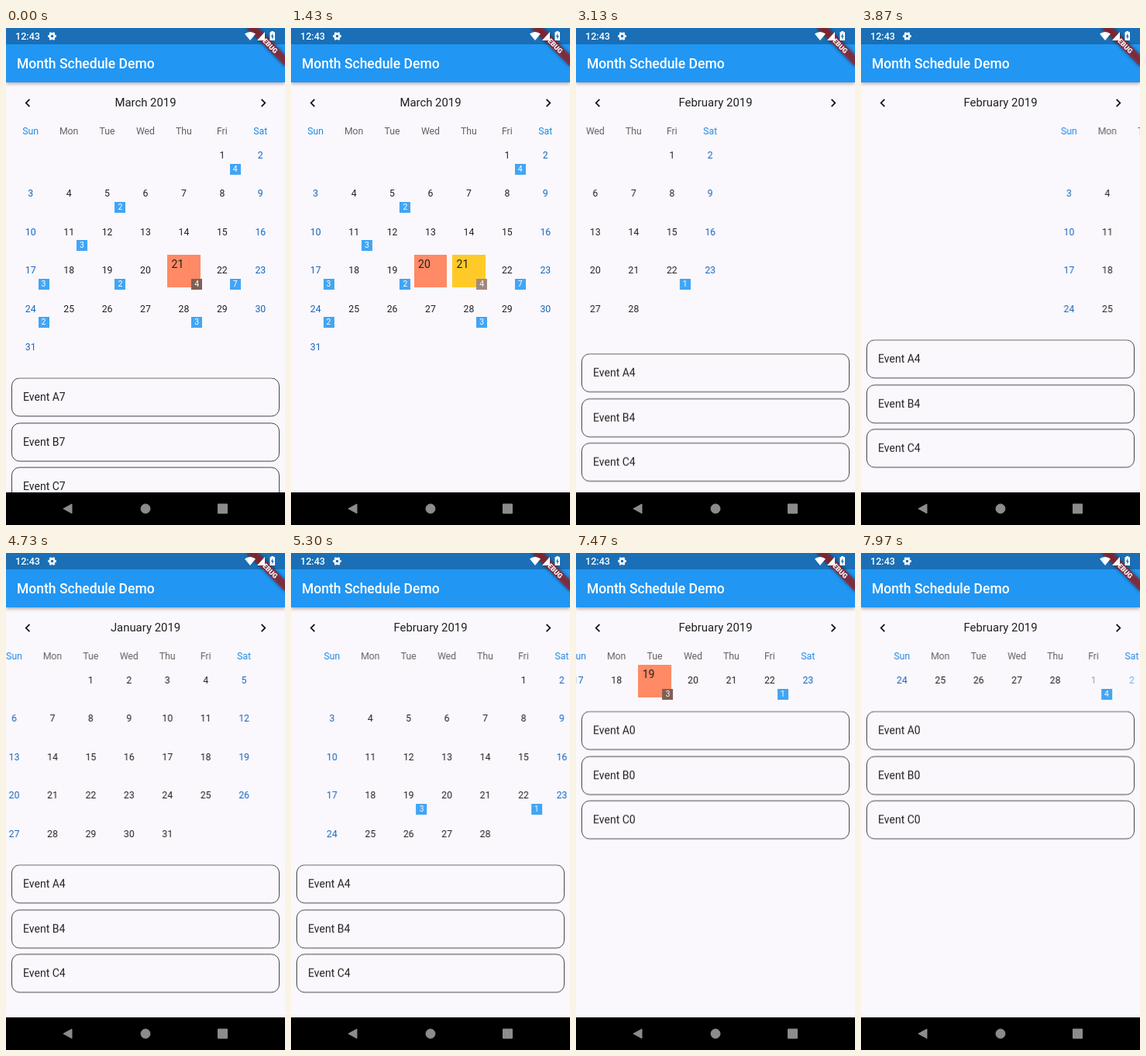
An HTML page that plays this animation: 360 by 640 pixels, repeating every 8000 ms.

```html
<!DOCTYPE html>
<html lang="en">
<head>
<meta charset="utf-8">
<title>Calendar</title>
<style>
html, body { margin: 0; width: 100%; height: 100%; overflow: hidden; }
body { position: relative; background: #faf8fc; font: 12.27px Roboto, sans-serif; color: #202020; }
div, svg { position: absolute; }
#stage { left: 0; top: 0; width: 360px; height: 640px; overflow: hidden; }
#bar { left: 0; top: 0; width: 360px; height: 70px; background: #2196f3; box-shadow: 0 2px 4px rgba(0,0,0,.3); }
#bar .status { left: 0; top: 0; width: 360px; height: 21px; background: #1a6fb6; }
#bar .name { left: 14px; top: 33px; line-height: 26px; font-size: 17.5px; font-weight: 500; color: #fff; white-space: nowrap; }
#top { left: 0; top: 0; }
#nav { left: 0; top: 598px; width: 360px; height: 42px; background: #000; }
.month { left: 0; top: 86px; width: 360px; line-height: 21px; font-size: 14.9px; text-align: center; }
.page { left: 7px; top: 0; width: 346px; height: 450px; }
.dow, .num { width: 49.43px; text-align: center; }
.dow { top: 123px; line-height: 20px; color: #616161; }
.dow.end { color: #1e88e5; }
.num { line-height: 49.43px; }
.num.end { color: #1565c0; }
.num.out { color: #9e9e9e; }
.num.out.end { color: #6fb1ee; }
.block { width: 42.4px; height: 42.4px; font-size: 14px; line-height: 16.4px; text-indent: 5.3px; padding-top: 4.4px; box-sizing: border-box; }
.badge { z-index: 1; width: 14px; height: 14px; line-height: 14px; font-size: 10.5px; text-align: center; color: #fff; }
#list { left: 0; top: 0; width: 360px; }
.event { left: 7px; width: 346px; height: 50.4px; box-sizing: border-box; border: 1px solid #444; border-radius: 10.5px; padding-left: 14px; font-size: 14px; line-height: 49px; }
</style>
</head>
<body>
<div id="stage">
  <div id="list"></div>
  <div id="pages"></div>
  <div id="bar">
    <div class="status"></div>
    <div class="name">Month Schedule Demo</div>
  </div>
  <div id="nav"></div>
  <svg id="top" width="360" height="640" font-family="Roboto, sans-serif" fill="#fff">
    <defs><filter id="soft" x="-20%" y="-80%" width="140%" height="260%"><feGaussianBlur stdDeviation="2.2"/></filter></defs>
    <g transform="translate(360 0) rotate(45)">
      <rect x="-35" y="24.5" width="70" height="10.5" fill="#000" opacity=".5" filter="url(#soft)"/>
      <rect x="-35" y="24.5" width="70" height="10.5" fill="#b71c1c" opacity=".63"/>
      <text y="33" text-anchor="middle" font-size="8.94" font-weight="900">DEBUG</text>
    </g>
    <text x="12" y="15.2" font-size="12.6" font-weight="500">12:43</text>
    <g fill="none" stroke="#fff">
      <circle cx="59.5" cy="10.5" r="3.1" stroke-width="2.6"/>
      <circle cx="59.5" cy="10.5" r="4.7" stroke-width="1.6" pathLength="12" stroke-dasharray="1 1" stroke-dashoffset=".5"/>
    </g>
    <path d="M308 7.4Q315 2.4 322 7.4L315 16z"/>
    <path d="M324 16H334V5z"/>
    <path d="M340.500 5.300H342.300V4H345.200V5.300H347V16H340.500z"/>
    <path d="M344.300 6.800L341.800 11.200H343.300V14.600L345.800 10.200H344.300z" fill="#1a6fb6"/>
    <g fill="#111">
      <path transform="translate(17.5 86) scale(.8766)" d="M15.410 7.410L14 6l-6 6 6 6 1.410-1.410L10.830 12z"/>
      <path transform="translate(321.500 86) scale(.8766)" d="M8.590 16.590L10 18l6-6-6-6-1.410 1.410L13.170 12z"/>
    </g>
    <g fill="#8c8c8c" stroke="#8c8c8c" stroke-linejoin="round">
      <path d="M74 619L85 613V625z"/>
      <circle cx="180" cy="619" r="6"/>
      <rect x="273.500" y="613" width="12" height="12"/>
    </g>
  </svg>
</div>
<script>
const LOOP = 8000, CELL = 49.43, TOP = 140;
const ORANGE = '#ff8a65', AMBER = '#ffca28', BLUE = '#42a5f5', BROWN = '#806054', TAN = '#a1887f';
const DECEL = 'cubic-bezier(.3333,.6667,.6667,1)';
const DECEL_CUT = 'cubic-bezier(.3333,.5833,.6667,.9167)';
const SWIPE = 'cubic-bezier(.33,.45,.67,.95)';
const RESIZE = 'cubic-bezier(.4,0,.2,1)';
const FAR = 415, WIDE = 346;
const TAP20 = 990, TAP11 = 1920, TAP19 = 5790, FOLD = 6570;
const rules = [];
const pages = document.getElementById('pages');
const list = document.getElementById('list');

function add(parent, cls, text = '', style = {}) {
  const el = document.createElement('div');
  el.className = cls;
  el.textContent = text;
  Object.assign(el.style, style);
  parent.append(el);
  return el;
}

// Each stop is [ms, value, easing]; without an easing the value holds.
function key(el, prop, ...stops) {
  const name = 'k' + rules.length;
  const body = stops.map(([ms, value, ease = 'step-end']) =>
    `${ms / LOOP * 100}%{${prop}:${value};animation-timing-function:${ease}}`);
  rules.push(`@keyframes ${name}{${body.join('')}}`);
  el.style.animation = `${name} ${LOOP}ms infinite`;
}

function show(el, ...spans) {
  const stops = spans.flatMap(([from, to]) => [[from, 1], [to, 0]]);
  if (spans[0][0] > 0) stops.unshift([0, 0]);
  key(el, 'opacity', ...stops);
}

const fadeIn = (el, from, to = LOOP) =>
  key(el, 'opacity', [0, 0], [from, 0, 'linear'], [from + 400, 1], [to, 0]);

const recolor = (el, from, a, b) =>
  key(el, 'background-color', [0, a], [from, a, 'linear'], [from + 300, b]);

const slide = (el, ...stops) =>
  key(el, 'transform', ...stops.map(([ms, x, ease]) => [ms, `translateX(${x}px)`, ease]));

const px = n => n.toFixed(2) + 'px';
const place = (slot, dx = 0, dy = 0) => ({
  left: px(slot % 7 * CELL + dx),
  top: px(TOP + Math.floor(slot / 7) * CELL + dy)
});

const days = (first, count, slot) =>
  Array.from({ length: count }, (_, i) => ({ day: first + i, slot: slot + i }));

function page(entries, counts = {}) {
  const el = add(pages, 'page'), nums = {}, badges = {};
  const end = slot => slot % 7 % 6 ? '' : ' end';
  ['Sun', 'Mon', 'Tue', 'Wed', 'Thu', 'Fri', 'Sat'].forEach((d, i) =>
    add(el, 'dow' + end(i), d, { left: px(i * CELL) }));
  for (const { day, slot, out } of entries) {
    nums[day] = add(el, 'num' + end(slot) + (out ? ' out' : ''), day, place(slot));
    if (counts[day]) {
      badges[day] = add(el, 'badge', counts[day], { ...place(slot, 34.5, 34.5), backgroundColor: BLUE });
    }
  }
  const block = (day, color) => {
    const { slot } = entries.find(e => e.day === day);
    return add(el, 'block', day, { ...place(slot, 3.5, 3.5), backgroundColor: color });
  };
  return { el, nums, badges, block };
}

// March
const mar = page(days(1, 31, 5), { 1: 4, 5: 2, 11: 3, 17: 3, 19: 2, 21: 4, 22: 7, 24: 2, 28: 3 });
mar.nums[21].remove();
show(mar.block(21, ORANGE), [0, TAP20]);
show(mar.block(21, AMBER), [TAP20, LOOP]);
recolor(mar.badges[21], TAP20, BROWN, TAN);
show(mar.nums[20], [0, TAP20], [TAP11, LOOP]);
fadeIn(mar.block(20, ORANGE), TAP20, TAP11);
show(mar.nums[11], [0, TAP11]);
fadeIn(mar.block(11, ORANGE), TAP11);
recolor(mar.badges[11], TAP11, BLUE, BROWN);
slide(mar.el, [0, 0], [2655, 0, SWIPE], [2920, WIDE]);

// February, shown twice
const feb = page(days(1, 28, 5), { 19: 3, 22: 1 });
show(feb.nums[19], [0, TAP19]);
fadeIn(feb.block(19, ORANGE), TAP19);
recolor(feb.badges[19], TAP19, BLUE, BROWN);
slide(feb.el, [0, -FAR], [2995, -FAR, DECEL], [3345, 0], [3725, 0, SWIPE], [4000, WIDE],
  [5030, FAR, DECEL], [5380, 0], [FOLD, -FAR]);

// January
const jan = page(days(1, 31, 2));
slide(jan.el, [0, -FAR], [4090, -FAR, DECEL], [4440, 0], [4720, 0, SWIPE], [4965, -WIDE]);

// Single weeks
const week = page(days(17, 7, 0), { 19: 3, 22: 1 });
week.nums[19].remove();
week.block(19, ORANGE);
week.badges[19].style.backgroundColor = BROWN;
slide(week.el, [0, FAR], [FOLD, 0], [7460, 0, SWIPE], [7640, -WIDE]);

const next = page([...days(24, 5, 0), { day: 1, slot: 5, out: true }, { day: 2, slot: 6, out: true }], { 1: 4 });
slide(next.el, [0, FAR], [7700, FAR, DECEL_CUT], [LOOP, FAR / 49]);

// Month heading
const month = (text, ...spans) => show(add(pages, 'month', text), ...spans);
month('March 2019', [0, 2995]);
month('February 2019', [2995, 4090], [5030, LOOP]);
month('January 2019', [4090, 5030]);

// Event list
function events(id, from, to) {
  const group = add(list, '');
  [...'ABC'].forEach((c, i) => add(group, 'event', `Event ${c}${id}`, { top: px(i * 57.5) }));
  show(group, [from, to]);
}
events(7, 0, TAP20);
events(4, TAP11, TAP19);
events(0, TAP19, LOOP);
const at = y => `translateY(${y}px)`;
key(list, 'transform', [0, at(450.4)], [2995, at(450.4), RESIZE], [3325, at(401.2)],
  [6591, at(401.2), RESIZE], [6851, at(203.6)]);

const sheet = document.createElement('style');
sheet.textContent = rules.join('\n');
document.head.append(sheet);
</script>
</body>
</html>
```
